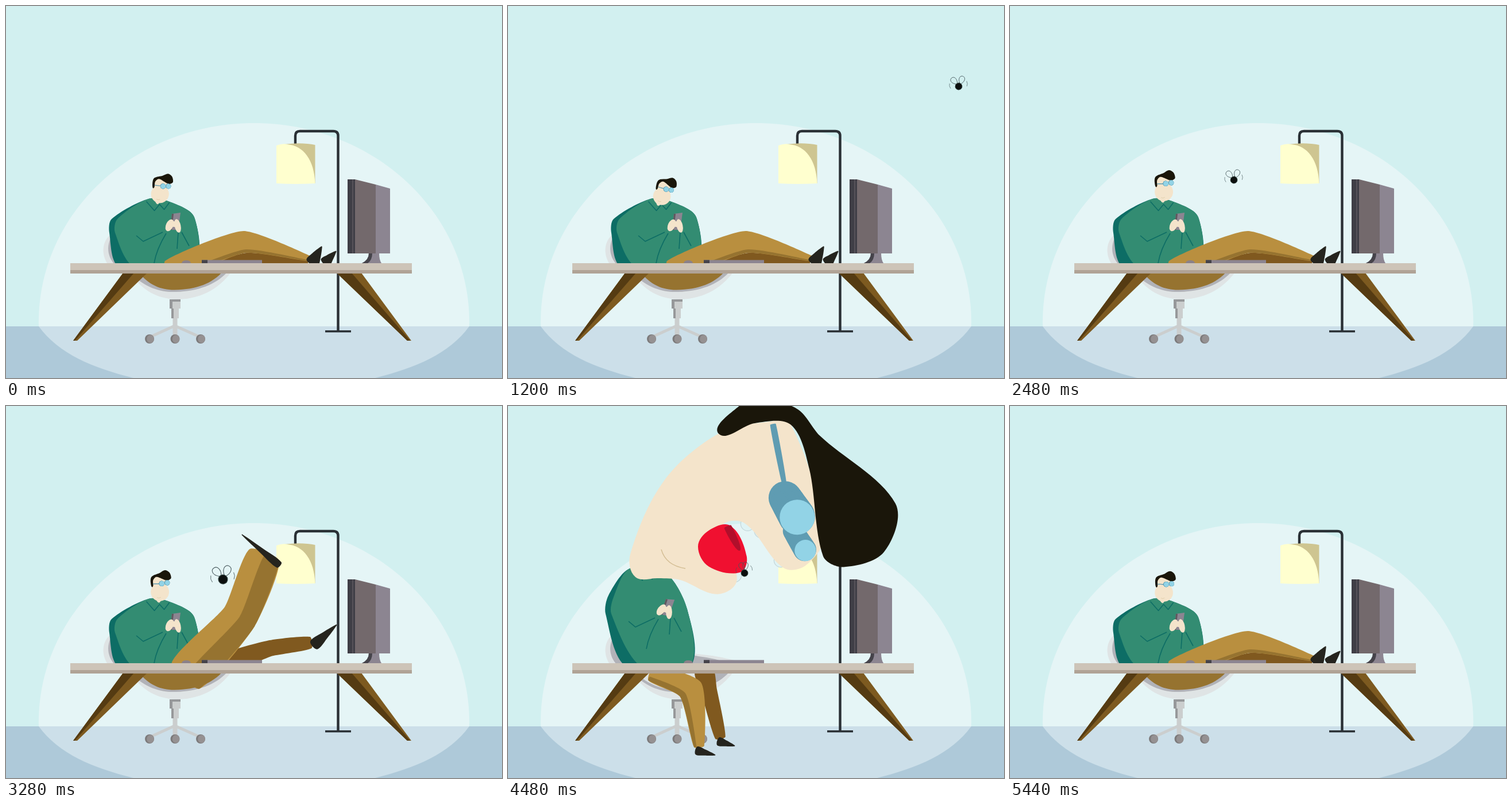
Animation, 864 px wide and 648 px high, one loop 5.52 s. Source, as an HTML page with a canvas:

```html
<!DOCTYPE html>
<html lang="en">
<head>
<meta charset="utf-8">
<title>Desk and fly</title>
<style>
  html, body { margin: 0; width: 100%; height: 100%; overflow: hidden; background: #d2f0f0; }
  canvas { display: block; }
</style>
</head>
<body>
<canvas id="stage" width="864" height="648"></canvas>
<script>
const ctx = document.getElementById('stage').getContext('2d');
const LOOP = 5520, STEP = 80, RAD = Math.PI / 180;
const TEAL = '#0d6d65', SKIN = '#f4e4cb', GOLD = '#b98f3f', BROWN = '#967330', DARK = '#80591f',
  BLACK = '#25241e', GLASS = '#92d3e6', FRAME = '#5f9cb2';

const pts = s => s.split(' ').map(p => p.split(',').map(Number));

function lerp(a, b, f) {
  if (Array.isArray(a)) return a.map((v, i) => lerp(v, b[i], f));
  if (typeof a === 'object') return Object.fromEntries(Object.keys(a).map(k => [k, lerp(a[k], b[k], f)]));
  return a + (b - a) * f;
}

// Blend between neighbouring poses; p is a fractional pose index.
function mix(list, p) {
  const i = Math.max(0, Math.min(Math.floor(p), list.length - 2));
  return lerp(list[i], list[i + 1], p - i);
}

// Smooth step from 0 to 1 between times a and b.
function ease(t, a, b) {
  const f = Math.max(0, Math.min(1, (t - a) / (b - a)));
  return f * f * (3 - 2 * f);
}

// Runs draw in a moved, turned and scaled frame.
function at(x, y, deg, scale, draw) {
  ctx.save();
  ctx.translate(x, y);
  ctx.rotate(deg * RAD);
  ctx.scale(scale, scale);
  draw();
  ctx.restore();
}

function fill(d, color) {
  ctx.fillStyle = color;
  ctx.fill(new Path2D(d));
}

function stroke(d, color, width) {
  ctx.strokeStyle = color;
  ctx.lineWidth = width;
  ctx.stroke(new Path2D(d));
}

function ellipse(x, y, rx, ry, color, deg = 0) {
  ctx.beginPath();
  ctx.ellipse(x, y, rx, ry, deg * RAD, 0, 7);
  ctx.fillStyle = color;
  ctx.fill();
}

// Closed smooth shape; k sets how round the corners are.
function blob(p, color, k = 0.33) {
  const n = p.length, get = i => p[(i + n) % n];
  const dir = i => {
    const [ax, ay] = get(i - 1), [bx, by] = get(i + 1);
    const l = Math.hypot(bx - ax, by - ay) || 1;
    return [(bx - ax) / l, (by - ay) / l];
  };
  ctx.beginPath();
  ctx.moveTo(...p[0]);
  for (let i = 0; i < n; i++) {
    const [x, y] = get(i), [X, Y] = get(i + 1), u = dir(i), v = dir(i + 1);
    const h = k * Math.hypot(X - x, Y - y);
    ctx.bezierCurveTo(x + u[0] * h, y + u[1] * h, X - v[0] * h, Y - v[1] * h, X, Y);
  }
  ctx.fillStyle = color;
  ctx.fill();
}

// Tapered band along joints [x, y, halfWidth], filled from side `from` to the right-hand edge.
function band(joints, color, from = -1, k = 0.12) {
  const edge = s => joints.map(([x, y, w], i) => {
    const a = joints[Math.max(0, i - 1)], b = joints[Math.min(joints.length - 1, i + 1)];
    const l = Math.hypot(b[0] - a[0], b[1] - a[1]);
    return [x - (b[1] - a[1]) / l * w * s, y + (b[0] - a[0]) / l * w * s];
  });
  blob([...edge(from), ...edge(1).reverse()], color, k);
}

/* Head outlines: stretched, about to bite. The small head is the first one, shrunk and turned. */
const skin = [
  '225,299 226,235 265,128 330,45 400,-12 455,-6 524,134 440,206 388,229 345,174 317,205 328,240 303,262 270,285 268,298',
  '222,298 213,258 272,130 367,48 450,28 493,33 550,225 520,277 480,282 412,204 372,212 399,303 365,328 300,303 262,300'
].map(pts);
const hair = [
  '309,70 335,0 400,-50 520,-12 605,8 632,75 600,151 560,154 524,132 490,68 447,-2 380,4',
  '367,48 403,0 440,-14 505,6 543,52 675,170 655,255 585,281 549,262 525,110 493,33 430,30'
].map(pts);
const tongue = [
  '324,195 333,178 342,180 346,220 338,229 328,216',
  '331,245 350,217 388,209 416,262 405,290 350,280'
].map(pts);
const groove = ['324,195 329,182 340,228', '377,213 389,208 404,252'].map(pts);

// Small, stretched, about to bite
const glasses = [
  { near: [444, 124, 38, 38], far: [510, 168, 36, 36], depth: [-5, -5], strap: [[345, 40, 5], [425, 110, 5]] },
  { near: [445, 124, 58, 28], far: [473, 164, 50, 18], depth: [-4, -4], strap: [[348, 28, 24], [437, 94, 22]] },
  { near: [504, 194, 31, 31], far: [518, 252, 19, 19], depth: [-21, -34], strap: [[462, 32, 5], [481, 132, 4]] }
];

// Neck position, size and turn: looking down, looking up, stretched
const headFrame = [[263, 347, .115, -24], [268, 341, .12, -42], [245, 300, 1, 0]];

/* Body: resting, stretched, about to bite */
const torso = [
  '248,336 184,371 180,395 198,455 325,455 328,368 285,341',
  '224,298 172,342 167,366 202,455 332,455 338,354 268,297',
  '212,283 175,330 170,362 207,455 316,455 312,354 272,288'
].map(pts);
const grip = [[294, 376, 0], [288, 366, 10], [277, 351, 12]];

/* Legs: on the desk, kicking, under the desk */
const nearLeg = [
  { hip: [283, 460, 17], knee: [415, 411, 19], ankle: [533, 441, 4], heel: [533, 448, 11], toe: [550, 419], shade: .7 },
  { hip: [313, 470, 33], knee: [407, 367, 31], ankle: [450, 260, 28], heel: [476, 277, 6], toe: [411, 224], shade: 0 },
  { hip: [250, 465, 14], knee: [318, 494, 22], ankle: [333, 593, 9], heel: [328, 600, 7], toe: [361, 608], shade: .5 }
];
const farLeg = [
  { hip: [350, 458, 8], knee: [420, 440, 10], ankle: [526, 444, 4], heel: [555, 448, 9], toe: [575, 427] },
  { hip: [385, 448, 16], knee: [460, 422, 14], ankle: [531, 412, 10], heel: [536, 417, 9], toe: [576, 381] },
  { hip: [341, 460, 16], knee: [350, 495, 14], ankle: [370, 578, 9], heel: [366, 584, 7], toe: [395, 592] }
];

const flyPath = [[400, 885, 262, 6], [600, 842, 235, 6], [1120, 826, 123, 6], [1200, 785, 140, 6],
  [1680, 757, 262, 6], [2480, 390, 303, 6], [3280, 378, 302, 8], [3920, 384, 291, 4], [4480, 412, 291, 6], [4640, 416, 291, 6]];

// 0 down, 1 up, 2 stretched, 3 about to bite
const headPose = t => ease(t, 1300, 1900) + ease(t, 3360, 3840) + 1.14 * ease(t, 3920, 4640)
  - 2.14 * ease(t, 4640, 5040) - ease(t, 5360, 5680);
const legPose = t => ease(t, 2880, 3280) + ease(t, 3360, 3680) - ease(t, 4720, 5040) - ease(t, 5040, 5400);

function drawRoom() {
  fill('M0 0H864V648H0Z', '#d2f0f0');
  fill('M0 558H864V648H0Z', '#aec9d9');
  fill('M57 558C53 360 225 204 432 204S811 360 807 558Z', '#e5f5f6');
  fill('M57 558C92 606 150 630 222 648H643C714 630 772 606 807 558Z', '#ccdfe9');
}

function drawLamp() {
  stroke('M504 242V226Q504 218 512 218H570Q578.5 218 578.5 226V566', '#2a3035', 4.4);
  fill('M556 565H601V568.6H556Z', '#2a3035');
  fill('M484 241Q515 237 538.5 242V309H500Z', '#cec591');
  fill('M471 243Q482 239 490 241C518 243 537 268 538.5 309Q505 311 471 309Z', '#ffffcf');
}

function drawChair() {
  fill('M180 400C163 416 167 447 190 462L220 470C242 500 270 511 300 511C345 510 374 488 392 464L411 448Q375 436 330 432Z', '#dfe4e5');
  fill('M182 405C172 428 182 450 205 462L220 468C243 491 270 499 296 498C335 497 365 485 384 465L386 449Q365 440 332 436Z', '#b1b2b8');
  stroke('M294 557L250 577M294 557L339 577', '#cbcece', 5);
  fill('M285 511H304V527H301V544H298.5V576H290.5V544H288V527H285Z', '#cbcece');
  fill('M285 511H304V515H290V527H292V544H288V527H285Z', '#96989a');
  for (const x of [250, 294.5, 339]) {
    ellipse(x, 580, 8, 8, '#7c7a7b');
    ellipse(x + 1.5, 580, 6.3, 7, '#959192');
  }
}

function drawSeat(seated) {
  if (seated) fill('M230 462C248 487 272 495 294 494.5C332 494 360 483 378 462Z', BROWN);
  else fill('M220 462C245 488 275 495 298 495C330 494 346 478 352 462Z', '#dfe4e5');
}

function drawBody(p) {
  const body = mix(torso, p), [x, y, tilt] = mix(grip, p);
  const left = body[0], right = body[6];
  blob(body, TEAL, .28);
  blob(body.map(([px, py], i) => [px + [0, 10, 10, 26][i] || px, py]), '#338c72', .28);
  at((left[0] + right[0]) / 2, (left[1] + right[1]) / 2, 0, 1, () =>
    stroke('M-22 2L-8 18L1 7L9 16L18 4', TEAL, 1.6));
  at(x, y, 0, 1, () =>
    stroke('M-67 24L-55 34L-21 18M-15 20Q-32 48 -36 72M6 18L4 47M12 18L25 42', TEAL, 1.6));
  at(x, y, tilt, 1, () => {
    fill('M-5 -14L10 -16L6 14H-8Z', '#8c8591');
    fill('M-5 -14L-2 -14L-5 14H-8Z', '#5f575e');
    ellipse(-9, 6, 6.3, 11, SKIN, 25);
    ellipse(5, 7, 5.4, 12, SKIN, -12);
    ellipse(-1, 4, 6, 5, SKIN);
  });
}

function drawLeg({ hip, knee, ankle, heel, toe, shade }, color) {
  const mid = lerp(heel.slice(0, 2), toe, .45);
  band([hip, knee, ankle], color, -1, .17);
  if (shade !== undefined) band([hip, knee, ankle], BROWN, shade, .17);
  band([heel, [...mid, heel[2] * .75], [...toe, .8]], BLACK, -1, .25);
}

function drawDesk() {
  fill('M204 465H246L124 583H117Z', '#7d5a20');
  fill('M204 465H223L120 583H117Z', '#553b12');
  fill('M576 465H619L706 583H699Z', '#7d5a20');
  fill('M576 465H602L704 583H699Z', '#553b12');
  fill('M306 448Q307 443 314 443T322 448Z', '#8b8189');
  fill('M341 442.5H446V448H341Z', '#8c8591');
  fill('M341 442.5H351V448H341Z', '#45434a');
  fill('M112 448H707V460H112Z', '#cdc4b8');
  fill('M112 460H707V466H112Z', '#b0a396');
}

function drawMonitor() {
  fill('M633 430H650Q650 442 654 448H620Q633 442 633 430Z', '#8c8591');
  fill('M632 430H638Q638 443 630 448H620Q632 442 632 430Z', '#45434a');
  fill('M595 302H608V431H595Z', '#3f3e46');
  fill('M603 302H605V431H603Z', '#57535a');
  fill('M608 302L644 311V431H608Z', '#73696c');
  fill('M644 311L669 318V431H644Z', '#8c8591');
}

function drawLens([x, y, rx, ry], [dx, dy]) {
  for (let f = 1; f > 0; f -= .08) {
    const s = 1 - f * .1;
    ellipse(x + dx * f, y + dy * f, rx * s + 1, ry * s + 1, FRAME, -46);
  }
  ellipse(x, y, rx - .5, ry - .5, GLASS, -46);
}

// Teeth follow the roof of the mouth, from the lip backwards.
function drawTeeth(face, bite) {
  const [lip, roof, , jaw] = face.slice(8), bend = [lip[0] - 20, roof[1] + 11];
  const tooth = (x, y) => {
    ellipse(x, y, 9 + 3 * bite, 9 + 3 * bite, '#dff3f4');
    ctx.strokeStyle = '#c3d6da';
    ctx.lineWidth = 1.2;
    ctx.stroke();
  };
  for (let f = .1; f < 1; f += .28) tooth(...lerp(lerp(lip, bend, f), lerp(bend, roof, f), f));
  tooth(jaw[0] - 4, jaw[1] - 8);
}

function drawHead(p) {
  const [x, y, size, turn] = p < 2 ? mix(headFrame, p) : headFrame[2];
  const grow = Math.max(0, p - 1), bite = Math.max(0, p - 2);
  const face = mix(skin, bite), { near, far, depth, strap } = mix(glasses, grow);
  at(x, y, turn, size, () => {
    ctx.translate(...headFrame[2].slice(0, 2).map(v => -v));
    if (grow) drawTeeth(face, bite);
    blob(face, SKIN);
    if (grow) {
      blob(mix(tongue, bite), '#f01030');
      blob(mix(groove, bite), '#b10f2b', .15);
    }
    // Round jaw of the small head
    if (grow < 1) ellipse(340, 195, 133 * (1 - grow), 133 * (1 - grow), SKIN);
    const sx = 256 + 11 * bite, sy = 229 + 21 * bite;
    stroke(`M${sx} ${sy}Q${sx + 8} ${sy + 28} ${sx + 42} ${sy + 33}`, '#d3bd93', 1.5 / Math.sqrt(size));
    blob(mix(hair, bite), '#1a160a', .3);
    band(strap, FRAME);
    stroke(`M${near[0]} ${near[1]}L${far[0]} ${far[1]}`, FRAME, 8);
    drawLens(far, depth);
    drawLens(near, depth);
  });
}

function drawFly(t) {
  const i = flyPath.findIndex(k => k[0] > t);
  if (i < 1) return;
  const a = flyPath[i - 1], b = flyPath[i];
  const [, x, y, r] = lerp(a, b, (t - a[0]) / (b[0] - a[0]));
  const flap = (t / STEP) % 2 ? 32 : 14;
  at(x, y, -8, r / 6, () => {
    for (const side of [-1, 1]) at(0, 0, side * flap, 1, () => {
      stroke('M-1 -6C-8 -14 -4 -20 1 -19S6 -11 2 -6', '#46575b', .8);
      stroke(`M${side * 9} -14Q${side * 13} -11 ${side * 13} -6`, '#46575b', .6);
    });
    ellipse(0, 0, 6.4, 6.4, '#2b3b38');
    ellipse(0, 0, 5.4, 5.4, '#0c0f0e');
  });
}

function draw(now) {
  const t = Math.floor(now % LOOP / STEP) * STEP;
  const u = t < 240 ? t + LOOP : t; // the nod runs across the loop point
  const p = headPose(u), q = legPose(u);
  drawRoom();
  drawLamp();
  drawChair();
  drawBody(Math.max(0, p - 1));
  const seated = q < 1.3;
  if (!seated) drawSeat(false);
  drawLeg(mix(farLeg, q), DARK);
  drawLeg(mix(nearLeg, q), GOLD);
  if (seated) drawSeat(true);
  drawDesk();
  drawMonitor();
  drawHead(p);
  drawFly(t);
}

let start = null;
function tick(now) {
  if (start === null) start = now;
  draw(now - start);
  requestAnimationFrame(tick);
}
ctx.lineJoin = 'round';
draw(0);
requestAnimationFrame(tick);
</script>
</body>
</html>
```
